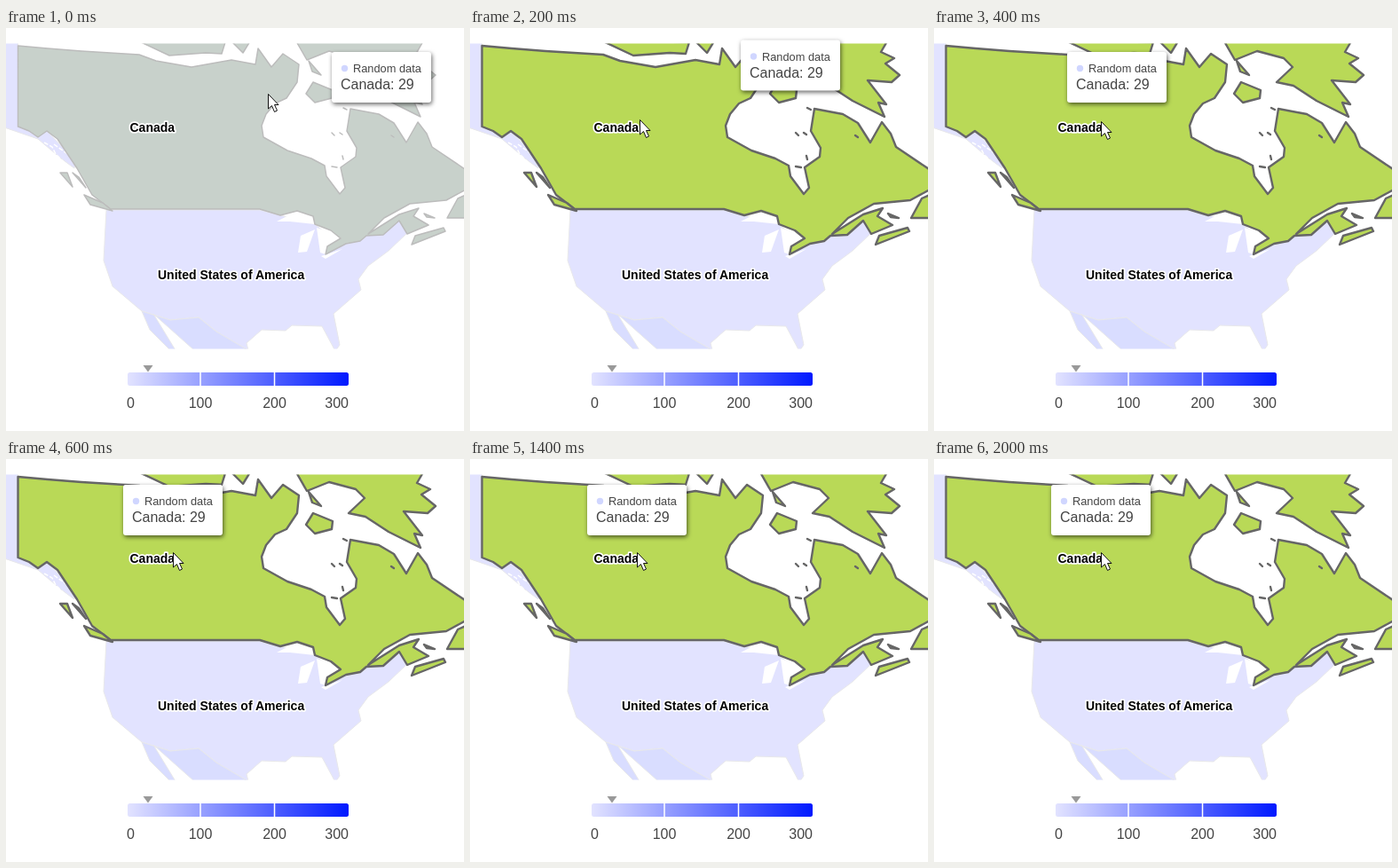
Recreate the animation shown at these times as an HTML page. Size 516x454 px, loop 2.1 s.

```html
<!DOCTYPE html>
<html lang="en">
<head>
<meta charset="utf-8">
<title>Map hover</title>
<style>
  html, body { margin: 0; width: 100%; height: 100%; overflow: hidden; background: #fff; }
  svg { display: block; width: 516px; height: 454px; font: 16px "Liberation Sans", Arial, sans-serif; fill: #444; }
  .country { fill: #e2e3ff; stroke: #e8e8ea; stroke-width: 1; }
  .mexico { fill: #d9ddff; }
  .label { font-size: 14px; font-weight: bold; fill: #000; stroke: #fff; stroke-width: 3.5px; stroke-linejoin: round; paint-order: stroke; }
  #tooltip rect { fill: #fff; filter: drop-shadow(1px 2px 2.5px #0009); }
  #canada { stroke-linejoin: round; }
</style>
</head>
<body>
<svg viewBox="0 0 516 454">
  <defs>
    <clipPath id="map"><rect y="17.5" width="516" height="344"/></clipPath>
    <linearGradient id="heat"><stop stop-color="#e2e3ff"/><stop offset="1" stop-color="#0019ff"/></linearGradient>
  </defs>

  <g clip-path="url(#map)">
    <!-- Alaska -->
    <path class="country" d="M-2 16H13.5V111L46 116 78 149 77 158 62 147 36 125 -2 112Z"/>
    <path d="M43 129l9 5 4 8 13 13M54 131l17 12 5 9" fill="none" stroke="#fff" stroke-width="1.5" stroke-dasharray="5 2"/>
    <!-- United States -->
    <path class="country" d="M113 205H286L348 221 377 245 406 234 443 217 452 231 431 251 408 268 397 283 400 295 369 322
      376 357 371 364 356 336 322 335 315 341 288 340 271 355 273 363 258 356 237 342 217 326 185 329 153 319 120 291 110 262Z"/>
    <!-- Mexico -->
    <path class="country mexico" d="M153 319 185 329 217 326 237 342 273 363H212L166 322 191 363H185L162 340Z"/>
    <!-- Great Lakes -->
    <path fill="#fff" d="M305 218 328 206 348 221 320 218ZM348 227 332 234 329 253 339 252ZM350 225 377 234 360 255 354 253ZM355 257 379 249 360 260Z"/>

    <g id="canada">
      <!-- Mainland -->
      <path d="M13.5 20 47 23 85 26 150 30 169 37 209 44 254 36 281 41 284 23 299 44 312 29 330 41 328 61 316 79
        303 85 293 97 288 110 290 123 317 138 344 147 359 155 361 167 376 187 382 180 377 157 394 145 395 135 384 116 388 91
        420 97 437 107 451 129 464 106 474 119 480 134 520 161V181L496 194 455 198 426 214 408 232 443 210 465 203 459 212
        476 222 452 232 443 217 425 233 406 234 399 240 383 243 360 255 362 246 377 237 366 228 348 221 346 212 328 206 309 211 286 204H118
        L97 188 80 158 58 125 46 116 36 123 26 116 13.5 111Z"/>
      <!-- Arctic islands -->
      <path d="M150 15 184 31 225 28 243 29 247 16ZM254 15 267 28 275 15Z"/>
      <path d="M327 15 339 36 364 26 394 34 404 44 386 61 405 65 431 82 467 100 460 84 469 86 448 59 475 61 484 53 468 40 478 34 463 27 470 15Z"/>
      <path d="M338 74 346 61 368 70 367 79 348 84ZM341 37 355 53 345 49Z"/>
      <!-- Atlantic and Pacific islands -->
      <path d="M497 214 509 192 520 187V214ZM457 244 461 234 493 225 495 229ZM471 209l12 5-9-1Z"/>
      <path d="M88 188 109 197 120 206 95 199ZM61 163h8l6 16ZM75 163l7 5 8 12Z"/>
      <!-- Bay islets -->
      <path d="M367 118l3 3ZM376 118l3 2ZM379 144l1 4ZM367 156l6 1ZM380 90l4 2ZM434 121l3 2Z"/>
    </g>
  </g>

  <text class="label" x="139.5" y="117">Canada</text>
  <text class="label" x="171" y="283">United States of America</text>

  <rect x="137" y="388" width="249" height="15" rx="2.5" fill="url(#heat)"/>
  <path d="M219 388v15M302.5 388v15" stroke="#fff" stroke-width="1.5"/>
  <path d="M154.5 380h11l-5.5 7.5Z" fill="#999"/>
  <text x="136" y="428">0</text>
  <g text-anchor="middle"><text x="219" y="428">100</text><text x="302.5" y="428">200</text></g>
  <text x="386" y="428" text-anchor="end">300</text>

  <g id="tooltip">
    <rect width="112" height="57" rx="3"/>
    <circle cx="14.5" cy="18.5" r="3.7" fill="#d0d6ff"/>
    <text x="24" y="23" font-size="12.8">Random data</text>
    <text x="10" y="42">Canada: 29</text>
  </g>
  <path id="cursor" d="M.5.5V17L4.5 13.5 7.5 20.5 10.5 19 7.5 12.5H12Z" fill="#fff" stroke="#111"/>
</svg>
<script>
  const STEP = 100, LOOP = 2100;
  const tooltipPath = [[367, 27], [329, 16], [305, 13.5], [215, 21], [150, 27], [137, 28.5], [132, 29]];
  const cursorPath = [[295, 74], [231, 77], [191, 103], [188, 105]];
  const hoverStyles = [
    { fill: '#c8d1cb', stroke: '#bcbcbc', 'stroke-width': 1.5 },
    { fill: '#c3d2b6', stroke: '#aaa', 'stroke-width': 1.8 },
    { fill: '#b9d957', stroke: '#666', 'stroke-width': 2.4 }
  ];
  const byId = id => document.getElementById(id);
  const held = (list, step) => list[Math.min(step, list.length - 1)];
  const setAttributes = (node, values) => {
    for (const [name, value] of Object.entries(values)) node.setAttribute(name, value);
  };
  const place = (id, point) => setAttributes(byId(id), { transform: `translate(${point})` });

  function draw() {
    const step = Math.floor((performance.now() % LOOP) / STEP);
    setAttributes(byId('canada'), held(hoverStyles, step));
    place('tooltip', held(tooltipPath, step));
    place('cursor', held(cursorPath, step));
    requestAnimationFrame(draw);
  }
  draw();
</script>
</body>
</html>
```
